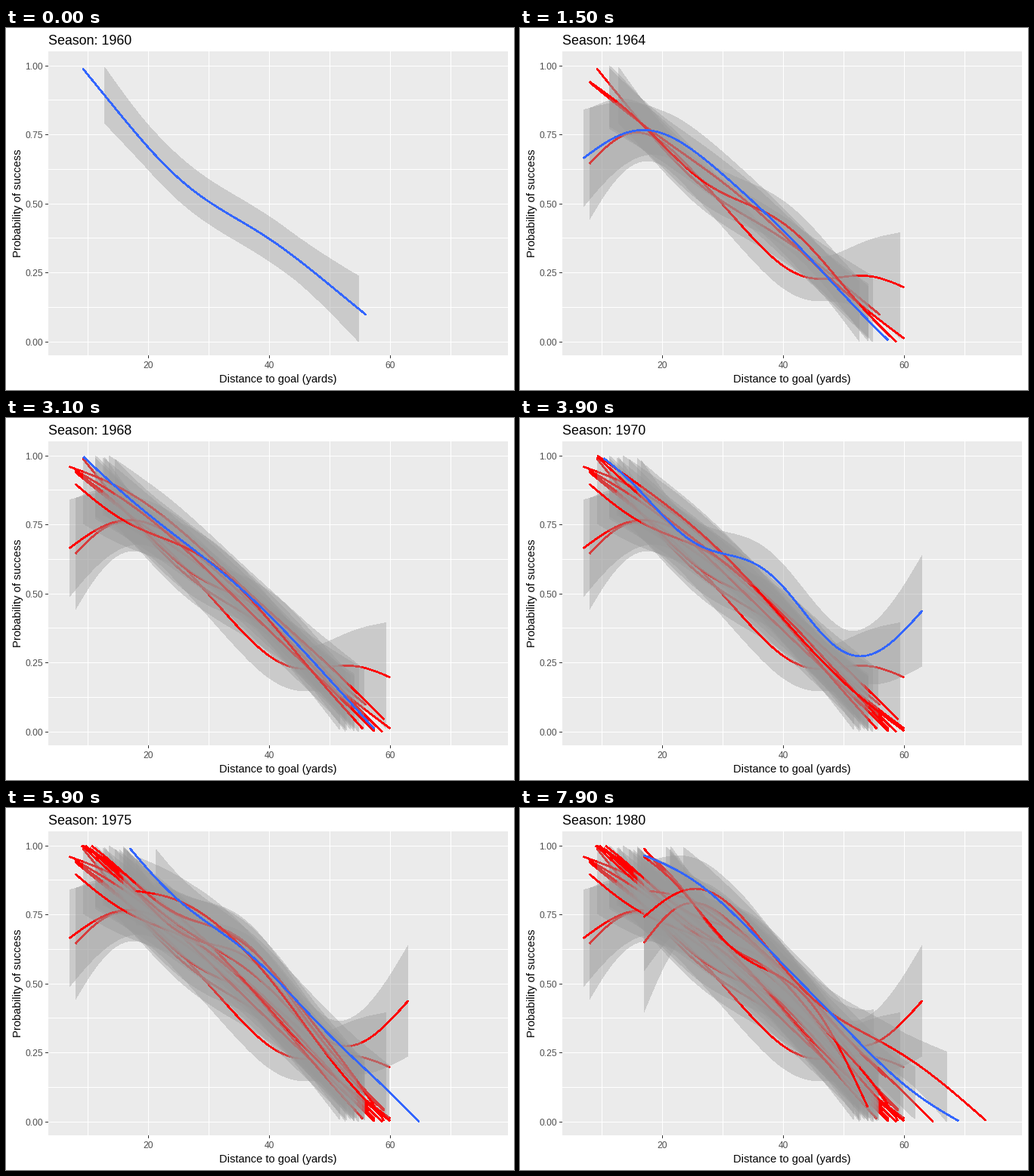
These frames come from a looping animation (672x480 px, 8 s). A matplotlib script:

```python
import matplotlib.pyplot as plt
import numpy as np
from matplotlib.animation import FuncAnimation
from matplotlib.patches import Polygon, Rectangle

W, H, DPI = 672, 480, 96
LEFT, RIGHT, TOP, BOTTOM = 56, 664, 31, 434
FIRST_YEAR = 1960
BLUE, RED, BAND, PANEL = "#3366FF", "#FF0000", "#999999", "#EBEBEB"
TICK, TICK_TEXT = "#333333", "#4D4D4D"

plt.rcParams["font.family"] = "Liberation Sans"
T = np.linspace(0, 1, 80)


def px(distance):
    return 28 + 8 * distance


def py(chance):
    return 416 - 366 * chance


def season(start, end, *waves, flare=0.045):
    """Rows x, fit, low, high: a chord bent by sine harmonics, with a band
    that widens over the outer quarters. Values outside 0..1 are dropped."""
    (x0, y0), (x1, y1) = start, end
    fit = y0 + (y1 - y0) * T
    for k, amp in enumerate(waves, 1):
        fit = fit + amp * np.sin(k * np.pi * T)
    edge = np.minimum(T, 1 - T)
    half = 0.08 + flare * np.clip(1 - 4 * edge, 0, 1) ** 1.5
    rows = np.array([fit, fit - half, fit + half])
    rows[(rows < 0) | (rows > 1)] = np.nan
    return np.vstack([x0 + (x1 - x0) * T, rows])


seasons = [
    season((8, 1.022), (56, .098), -.077, -.034, .003, .005),
    season((8, .645), (60, .197), .022, .127, .058, 0, .015, flare=.12),
    season((8, .94), (60, .012), .02, .006, -.011),
    season((8, .942), (60, -.027), .042, -.036, 0, .021),
    season((7, .665), (60, -.05), .252, .074, .021, .01, flare=.095),
    season((7, .96), (59, .045), .085, .023, .01),
    season((8, .946), (60, -.055), .056, .018, .007),
    season((8, .897), (58, -.05), .118, -.008, -.025, -.006),
    season((8, 1.023), (60, -.052), .051, -.014, -.008),
    season((8, 1.02), (60, .003), .035, .032, -.009),
    season((9, 1.013), (63, .438), -.212, .074, -.072, .026, .015, flare=.12),
    season((9, 1.012), (58.5, .05), .048, -.023, -.012, .009),
    season((9, .999), (59, .04), .122, -.021, -.027, .017, .012),
    season((8, 1.042), (61, -.065), .149, -.048, -.017, .006, .012),
    season((18, .836), (58.5, .02), .135, .04, -.003, .004),
    season((17, .99), (66, -.028), .015, -.007, -.013, -.01),
    season((17, .648), (57, .162), .232, .076, .027, .014, flare=.17),
    season((18, .965), (57, .077), .016, -.028, -.006, .01, .012),
    season((17, .96), (54, .053), .093, -.06, .03, .008),
    season((17, .742), (73.5, .005), .135, .085, .069, .015, flare=.115),
    season((17, .965), (69, .003), .022, .048, .003, .008),
]


def line_xy(s):
    x, fit = s[:2, ~np.isnan(s[1])]
    return px(x), py(fit)


def band_xy(s):
    x, _, low, high = s[:, ~np.isnan(s[2] + s[3])]
    return np.column_stack([px(np.r_[x, x[::-1]]), py(np.r_[high, low[::-1]])])


fig = plt.figure(figsize=(W / DPI, H / DPI), dpi=DPI, facecolor="white")
ax = fig.add_axes([0, 0, 1, 1])
ax.set_xlim(0, W)
ax.set_ylim(H, 0)
ax.axis("off")


def box(x, y, w, h, color):
    ax.add_patch(Rectangle((x, y), w, h, facecolor=color, lw=0,
                           antialiased=False, zorder=1))


def label(x, y, text, size, color="black", **kw):
    return ax.text(x, y, text, fontsize=size * 72 / DPI, color=color,
                   va="baseline", **kw)


box(LEFT, TOP, RIGHT - LEFT, BOTTOM - TOP, PANEL)
for v in range(10, 71, 10):
    x = px(v)
    box(x, TOP, 1, BOTTOM - TOP, "white")
    if v % 20 == 0:
        box(x, BOTTOM, 1, 4, TICK)
        label(x, 451, str(v), 12, TICK_TEXT, ha="center")
for k in range(9):
    y = np.floor(py(k / 8))
    box(LEFT, y, RIGHT - LEFT, 1, "white")
    if k % 2 == 0:
        box(LEFT - 4, y, 4, 1, TICK)
        label(49, y + 5, f"{k / 8:.2f}", 12, TICK_TEXT, ha="right")

label(360, 470, "Distance to goal (yards)", 14.67, ha="center")
label(20, 232.5, "Probability of success", 14.8, ha="center", rotation=90,
      rotation_mode="anchor")
title = label(56, 22, "", 17.9)


def smooth(s, color, z):
    band = Polygon(band_xy(s), closed=True, facecolor=BAND, alpha=0.4, lw=0,
                   antialiased=False, zorder=z)
    ax.add_patch(band)
    line, = ax.plot(*line_xy(s), color=color, lw=1.6 * 72 / DPI, zorder=z + 0.5,
                    antialiased=False, solid_capstyle="butt")
    return band, line


trail = [smooth(s, RED, 2 + i) for i, s in enumerate(seasons)]
band, line = smooth(seasons[0], BLUE, 50)


def update(step):
    # four steps per season: one halfway morph, then three at rest
    n, phase = divmod(step + 2, 4)
    now = seasons[n] if phase else (seasons[n - 1] + seasons[n]) / 2
    for i, pair in enumerate(trail):
        for artist in pair:
            artist.set_visible(i < n)
    band.set_xy(band_xy(now))
    line.set_data(*line_xy(now))
    title.set_text(f"Season: {FIRST_YEAR + n}")
    return band, line, title


anim = FuncAnimation(fig, update, frames=80, interval=100, repeat=True,
                     repeat_delay=0, blit=False)
plt.show()
```
